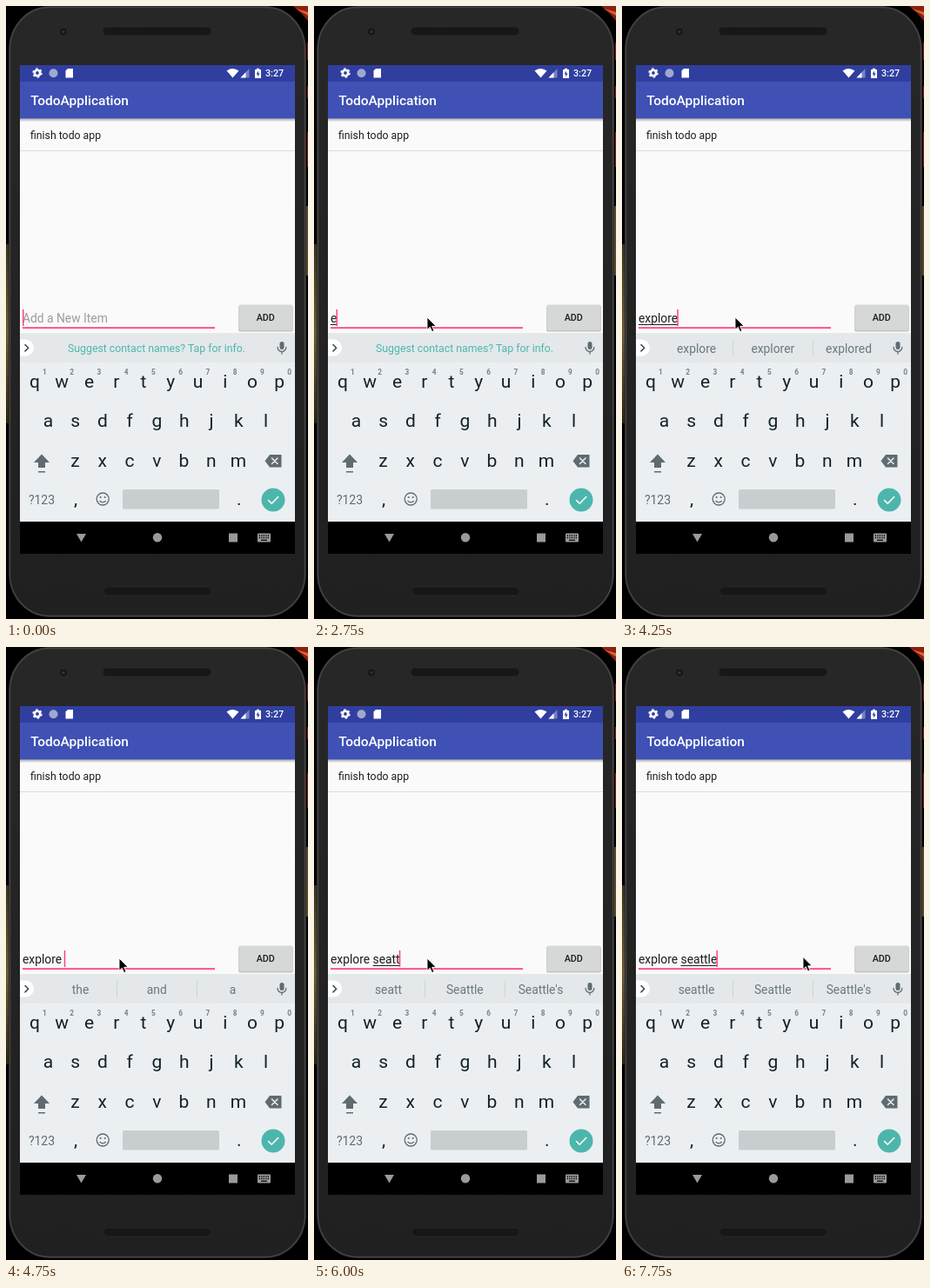
Recreate the animation shown at these times as an HTML page. Size 347 by 705 pixels, loop 8 s.

```html
<!DOCTYPE html>
<html lang="en">
<head>
<meta charset="utf-8">
<title>Todo app</title>
<style>
html, body { margin: 0; width: 100%; height: 100%; overflow: hidden; background: #000; }
svg { display: block; width: 347px; height: 705px; font-family: Roboto, sans-serif; }
text { white-space: pre; }
.mid { text-anchor: middle; }
.line { fill: none; stroke-linecap: round; stroke-linejoin: round; }
</style>
</head>
<body>
<svg viewBox="0 0 347 705">
  <defs>
    <linearGradient id="left" x2="0" y2="1">
      <stop offset="0" stop-color="#3a3218"/><stop offset=".5" stop-color="#6a5a2c"/><stop offset="1" stop-color="#2c2410"/>
    </linearGradient>
    <linearGradient id="shade" x2="0" y2="1">
      <stop offset="0" stop-color="#000" stop-opacity=".3"/><stop offset="1" stop-color="#000" stop-opacity="0"/>
    </linearGradient>
    <linearGradient id="body" x2="0" y2="1">
      <stop offset="0" stop-color="#272728"/><stop offset="1" stop-color="#202021"/>
    </linearGradient>
  </defs>

  <!-- Backdrop -->
  <path fill="url(#left)" d="M0 274h5v206h-5z"/>
  <path fill="#5c4a20" d="M344 230h3v80h-3z"/>
  <path fill="#8c1f14" d="M330 0h17v17q-7-9-17-17zM346 42h1v20h-1zM346 92h1v14h-1zM346 145h1v40h-1z"/>
  <path fill="#e0642c" d="M333 3l14 4v4z"/>

  <!-- Phone -->
  <rect x="3" y="0" width="342" height="703" rx="47" ry="50" fill="url(#body)"/>
  <rect x="4.500" y="1.500" width="339" height="700" rx="45.500" ry="48.500" fill="none" stroke="#454546" stroke-width="1.400"/>
  <g fill="#171718" stroke="#303031" stroke-width=".6">
    <rect x="111" y="24" width="125" height="10" rx="5"/>
    <rect x="112" y="668" width="124" height="10" rx="5"/>
    <circle cx="66" cy="29.500" r="4.500"/>
  </g>
  <circle cx="66" cy="29.500" r="1.500" fill="#34373d"/>

  <!-- App -->
  <path fill="#fafafa" d="M16 68h316v562h-316z"/>
  <path fill="#303f9f" d="M16 68h316v19h-316z"/>
  <path fill="#3f51b5" d="M16 87h316v42.500h-316z"/>
  <path fill="url(#shade)" d="M16 129.500h316v4h-316z"/>
  <path fill="#dcdcdc" d="M16 166h316v1h-316z"/>
  <text x="28.300" y="114" font-size="15.500" font-weight="500" fill="#fff">TodoApplication</text>
  <text x="28" y="152.500" font-size="12.290" fill="#1c1c1c">finish todo app</text>

  <!-- Status bar -->
  <g fill="#fff">
    <circle cx="36" cy="77" r="3.200" fill="none" stroke="#fff" stroke-width="2.600"/>
    <circle cx="36" cy="77" r="5" fill="none" stroke="#fff" stroke-width="1.400" stroke-dasharray="2.600 2.640"/>
    <circle cx="54.500" cy="77.200" r="5" fill="#a0a8d2"/>
    <path d="M71 72h6v10.500h-8.500v-8z"/>
    <path d="M253.500 74.500q7-5 14 0l-7 8z"/>
    <path opacity=".35" d="M269.500 82.500l10-10.500v10.500z"/>
    <path d="M269.500 82.500l6-6.300v6.300z"/>
    <path d="M286 73h2v-1.200h3v1.200h2v10h-7z"/>
    <path fill="#303f9f" d="M290 74.500l-2.500 4h1.700v3l2.500-4h-1.700z"/>
    <text x="298" y="81.300" font-size="10.750" font-weight="500">3:27</text>
  </g>

  <!-- Entry row -->
  <path fill="#ff4081" d="M19 369.300h221v1.600h-221z"/>
  <text id="hint" x="19" y="364" font-size="13.830" fill="#9b9b9b">Add a New Item</text>
  <text id="entry" x="19" y="364" font-size="13.830" fill="#1c1c1c"></text>
  <path id="compose" fill="#1c1c1c"/>
  <path id="caret" fill="#ff4081" d="M0 349h1.500v19h-1.500z"/>
  <rect x="267" y="344.500" width="63" height="30" rx="2" fill="#c2c2c2"/>
  <rect x="267.500" y="343.500" width="62" height="29.500" rx="1.500" fill="#d6d7d7"/>
  <text class="mid" x="298.300" y="362" font-size="10.750" font-weight="500" fill="#1c1c1c">ADD</text>

  <!-- Suggestion strip -->
  <path fill="#eceff1" d="M16 376h316v217h-316z"/>
  <path fill="#e4e8eb" d="M16 376h316v34h-316z"/>
  <path fill="#fff" d="M16 383.500h6.500a9.500 9.500 0 0 1 0 19h-6.500z"/>
  <path class="line" stroke="#37474f" stroke-width="1.500" d="M22 389.500l3.700 3.700-3.700 3.700"/>
  <text id="tip" class="mid" x="173" y="398" font-size="12.290" fill="#4db6ac">Suggest contact names? Tap for info.</text>
  <g id="words" class="mid" font-size="13.830" fill="#6b777d">
    <path fill="#cdd3d6" d="M127 384h1v19h-1zM219 384h1v19h-1z"/>
    <text x="85.500" y="398.500"></text><text x="173.300" y="398.500"></text><text x="260.500" y="398.500"></text>
  </g>
  <rect x="314.500" y="386" width="5" height="9" rx="2.500" fill="#5f6b71"/>
  <path class="line" stroke="#5f6b71" stroke-width="1.300" d="M312 392.500a4.900 4.900 0 0 0 9.800 0M317 397.500v2.500"/>

  <!-- Keyboard -->
  <g id="keys" class="mid" font-size="21" fill="#13222a"></g>
  <g fill="#5f6b71">
    <path d="M41 515.500l9 9.500h-5v6h-8v-6h-5zM37 535h8v1.500h-8z"/>
    <path d="M303 516h13.500v14.500h-13.500l-5.500-7.250z"/>
    <text class="mid" x="41" y="572.500" font-size="14">?123</text>
  </g>
  <path class="line" stroke="#eceff1" stroke-width="1.500" d="M305.500 520l6.500 6.500M312 520l-6.500 6.500"/>
  <circle cx="111.200" cy="567" r="7" fill="none" stroke="#5f6b71" stroke-width="1.300"/>
  <path class="line" stroke="#5f6b71" stroke-width="1.200" d="M107.800 569.300q3.400 3.200 6.800 0"/>
  <circle cx="108.700" cy="565" r="1.100" fill="#5f6b71"/><circle cx="113.700" cy="565" r="1.100" fill="#5f6b71"/>
  <rect x="134" y="556" width="111" height="22.500" rx="1.500" fill="#c8cdd0"/>
  <circle cx="307" cy="568" r="13.500" fill="#4db6ac"/>
  <path class="line" stroke="#fff" stroke-width="1.600" d="M301.500 568.500l3.700 3.700 7.500-7.700"/>

  <!-- Navigation bar -->
  <path d="M16 593h316v37h-316z"/>
  <g fill="#9a9a9a">
    <path d="M81 607h11l-5.500 9.500z"/>
    <circle cx="174" cy="611.300" r="5.200"/>
    <path d="M256 606.500h10v10h-10z"/>
    <rect x="289" y="606.500" width="15" height="10" rx="1"/>
  </g>
  <path stroke="#000" stroke-width="1.300" stroke-dasharray="1.300 1.200" d="M290.700 609h12M290.700 611.500h12"/>
  <path stroke="#000" stroke-width="1.200" d="M293 614.300h7"/>

  <path id="mouse" stroke="#fff" stroke-width=".9" d="M0 0V14.300L3.300 11.200 5.600 16.500 8 15.500 5.700 10.300H10.300Z"/>
</svg>
<script>
const LOOP = 8000, LEFT = 19;
const $ = id => document.getElementById(id);

// time, text, then the three suggestions
const typing = [
  [0, ""], [2750, "e"], [3000, "ex"],
  [3750, "exp", "exp", "expected", "expect"],
  [4000, "expl", "expl", "explain", "explained"],
  [4250, "explore", "explore", "explorer", "explored"],
  [4750, "explore ", "the", "and", "a"],
  [5000, "explore s", "s", "so", "some"],
  [5250, "explore se", "se", "see", "send"],
  [5500, "explore sea", "sea", "seat", "search"],
  [5750, "explore seat", "seat", "Seattle", "seats"],
  [6000, "explore seatt", "seatt", "Seattle", "Seattle's"],
  [6250, "explore seattl", "seattl", "Seattle", "Seattle's"],
  [6500, "explore seattle", "seattle", "Seattle", "Seattle's"]
];
const caretOff = [[250, 750], [1250, 1750], [2250, 2750], [3500, 3750], [7000, 7500]];
const pointer = [[0, -50, 0], [1000, 220, 314], [1250, 143.5, 346], [1500, 130, 358], [7750, 208, 356.5]];

const current = (steps, t) => steps.filter(s => s[0] <= t).pop();
const show = (id, on) => $(id).setAttribute("visibility", on ? "visible" : "hidden");

function addKeys(letters, x, y, style = "") {
  [...letters].forEach((c, i) => $("keys").insertAdjacentHTML("beforeend",
    `<text x="${x + i * 31.25}" y="${y}" ${style}>${c}</text>`));
}
addKeys("qwertyuiop", 33, 439);
addKeys("1234567890", 44.3, 424, 'font-size="8.3" font-weight="700" fill="#75828a"');
addKeys("asdfghjkl", 48.5, 484.3);
addKeys("zxcvbnm", 79.5, 529.5);
addKeys(",", 80, 574);
addKeys(".", 267.7, 574);

function width(text) {
  $("entry").textContent = text;
  return text ? $("entry").getComputedTextLength() : 0;
}

let shown;
function setTyping(step) {
  if (step === shown) return;
  shown = step;
  const [, text, ...words] = step;
  const start = LEFT + width(text.slice(0, text.lastIndexOf(" ") + 1));
  const end = LEFT + width(text);
  $("compose").setAttribute("d", `M${start} 366H${end}v1H${start}z`);
  $("caret").setAttribute("transform", `translate(${text ? end - .8 : LEFT})`);
  show("hint", !text);
  show("tip", !words.length);
  show("words", words.length);
  $("words").querySelectorAll("text").forEach((el, i) => el.textContent = words[i] || "");
}

function draw() {
  const t = performance.now() % LOOP;
  setTyping(current(typing, t));
  show("caret", !caretOff.some(([from, to]) => t >= from && t < to));
  const [, x, y] = current(pointer, t);
  $("mouse").setAttribute("transform", `translate(${x} ${y})`);
  requestAnimationFrame(draw);
}
draw();
</script>
</body>
</html>
```
